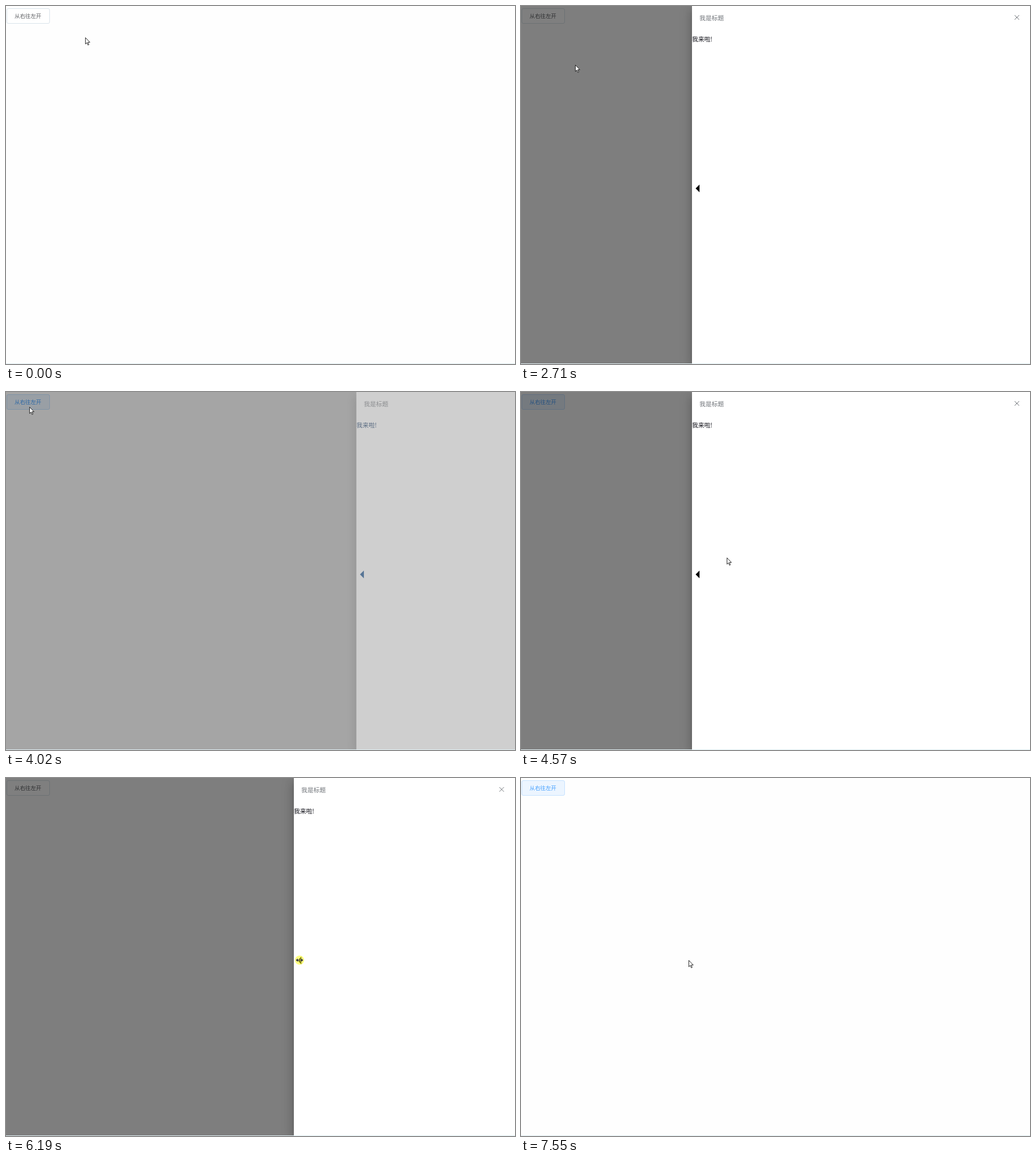
Animation of 893 by 627 pixels, one loop 7750 ms. Source, as an HTML page:

```html
<!DOCTYPE html>
<html lang="zh-CN">
<head>
<meta charset="utf-8">
<title>Drawer</title>
<style>
html, body { margin: 0; width: 100%; height: 100%; overflow: hidden; background: #fff; }
#stage { position: relative; width: 893px; height: 627px; overflow: hidden; background: #fefefe; }
#stage svg { position: absolute; left: 0; top: 0; overflow: visible; }
#view { position: absolute; width: 893px; height: 626px; overflow: hidden; }
#modal { position: absolute; inset: 0; background: #000; }
#drawer {
  position: absolute; top: 0; height: 626px; background: #fff;
  box-shadow: 0 5px 7px -3px rgba(0,0,0,.2), 0 11px 16px 1px rgba(0,0,0,.14), 0 4px 20px 3px rgba(0,0,0,.12);
}
text { font-family: "Noto Sans CJK SC", "Noto Sans CJK", "Noto Sans", sans-serif; }
</style>
</head>
<body>
<div id="stage">
  <div id="view">
    <svg width="893" height="626">
      <rect id="box" x="1.5" y="4.5" width="75" height="26" rx="2.5"/>
      <text id="label" x="15" y="21" font-size="9.4">从右往左开</text>
    </svg>
    <div id="modal"></div>
    <div id="drawer">
      <svg width="593" height="626">
        <text x="13" y="24.6" font-size="10.75" fill="#72767b">我是标题</text>
        <text id="body" x="0" y="61.6" font-size="10.75">我来啦!</text>
        <path id="handle" d="M6.4 319.5L13.2 312.8V326.2Z"/>
        <path id="close" d="M-4 -4L4 4M4 -4L-4 4" stroke="#72767b" stroke-width="1"/>
      </svg>
    </div>
  </div>
  <svg width="893" height="627">
    <rect y="626" width="893" height="1" fill="#dfeef2"/>
    <circle id="press" r="8" fill="#ff0" fill-opacity=".5"/>
    <path id="arrow" d="M.4 .4V11.6L3 9.2L4.7 13.4L6.4 12.7L4.7 8.6H8.2Z" fill="#fff" stroke="#111" stroke-width=".9"/>
    <path id="resize" d="M-6.5 0L-3 -3.3V-.8H3V-3.3L6.5 0L3 3.3V.8H-3V3.3Z" fill="#222" stroke="#fff" stroke-opacity=".6" stroke-width=".6"/>
  </svg>
</div>
<script>
const LOOP = 7750, STAGE = 893, SLIDE = 300, FADE = 200, PRESS = 110, GRIP = 9.5;
const $ = id => document.getElementById(id);
const clamp = (v, lo = 0, hi = 1) => Math.max(lo, Math.min(hi, v));
const lerp = (a, b, p) => a + (b - a) * p;
const within = (t, a, b) => t >= a && t < b;
const mix = (a, b, p) => `rgb(${a.map((v, i) => Math.round(lerp(v, b[i], p)))})`;

const opens = [1347.5, 3937.5], closes = [2715, 7190];
const drag = { start: 5380, stop: 6600, release: 6730 };

// Pointer moves: start, end, x, y
const home = [139, 55];
const moves = [
  [190, 820, 54, 19],
  [2300, 2440, 95, 103],
  [2840, 3410, 41, 26],
  [4150, 4570, 361, 290],
  [4570, 5100, 309.5, 319],
  [drag.start, 5720, 187, 319],
  [5920, 6190, 515, 319],
  [6190, drag.stop, 406, 319],
  [drag.release, 6940, 294, 319]
];

function pointerAt(t) {
  return moves.reduce((pos, [a, b, ...to]) => {
    const p = clamp((t - a) / (b - a)), q = p * p * (3 - 2 * p);
    return pos.map((v, i) => lerp(v, to[i], q));
  }, home);
}

// The drawer's left edge follows the pointer while it is dragged
const edgeAt = t => pointerAt(clamp(t, drag.start, drag.stop))[0] - GRIP;

// CSS "ease" timing curve
function ease(x) {
  if (x <= 0 || x >= 1) return clamp(x);
  const at = (s, a, b) => 3 * (1 - s) * (1 - s) * s * a + 3 * (1 - s) * s * s * b + s ** 3;
  let lo = 0, hi = 1;
  for (let i = 0; i < 22; i++) {
    const mid = (lo + hi) / 2;
    if (at(mid, .25, .25) < x) lo = mid; else hi = mid;
  }
  return at(lo, .1, 1);
}

// 0 is shut, 1 is open
function openness(t, duration) {
  const sum = list => list.reduce((s, a) => s + ease((t - a) / duration), 0);
  return sum(opens) - sum(closes);
}

function drawButton(t) {
  const ramp = a => clamp((t - a) / 70);
  const lit = ramp(640) - ramp(2630) + ramp(2780) - ramp(drag.start) + ramp(7200);
  $('box').setAttribute('fill', mix([255, 255, 255], [236, 245, 255], lit));
  $('box').setAttribute('stroke', mix([217, 227, 234], [198, 226, 255], lit));
  $('label').setAttribute('fill', mix([90, 92, 96], [64, 158, 255], lit));
}

function drawDrawer(t) {
  const p = openness(t, SLIDE), edge = edgeAt(t), width = STAGE - edge;
  $('modal').style.opacity = openness(t, FADE) / 2;
  const style = $('drawer').style;
  style.left = edge + 'px';
  style.width = width + 'px';
  style.opacity = p;
  style.transform = `translateX(${width * (1 - p)}px)`;
  $('close').setAttribute('transform', `translate(${width - 23} 20)`);
  $('handle').setAttribute('fill', mix([0, 120, 255], [0, 0, 0], p));
  $('body').setAttribute('fill', mix([0, 70, 150], [16, 16, 24], p));
}

function drawPointer(t) {
  const [x, y] = pointerAt(t);
  const dragging = within(t, drag.start, drag.release);
  const sizing = within(t, 5090, drag.release);
  const clicking = [...opens, ...closes].some(c => within(t, c - PRESS, c - 5));
  const place = (id, on) => {
    $(id).setAttribute('transform', `translate(${x} ${y})`);
    $(id).setAttribute('visibility', on ? 'visible' : 'hidden');
  };
  place('arrow', !sizing);
  place('resize', sizing);
  place('press', dragging || clicking);
}

function draw(t) {
  drawButton(t);
  drawDrawer(t);
  drawPointer(t);
}

const start = performance.now();
function tick() {
  draw((performance.now() - start) % LOOP);
  requestAnimationFrame(tick);
}
tick();
</script>
</body>
</html>
```
